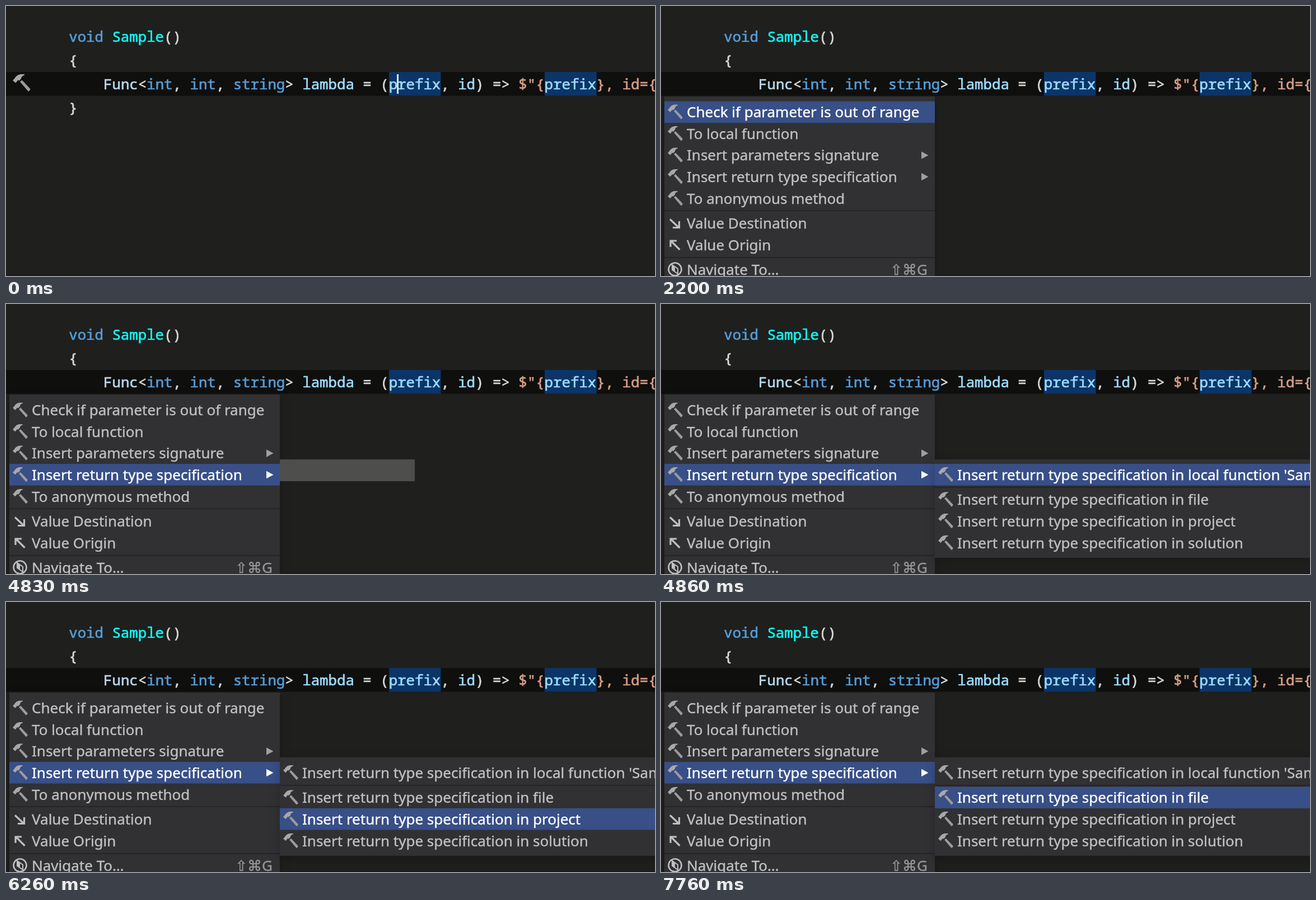
Recreate the animation shown at these times as an HTML page. Size 1159 by 483 pixels, loop 8 s.

```html
<!DOCTYPE html>
<html lang="en">
<head>
<meta charset="utf-8">
<style>
html, body { margin: 0; width: 100%; height: 100%; overflow: hidden; background: #1f1f1e; }
svg { display: block; width: 1159px; height: 483px; }
text {
  white-space: pre; font: 26px "Noto Sans", "DejaVu Sans", sans-serif;
  font-variant-ligatures: none; stroke-width: .4px;
}
.code { font: 25.74px "Noto Sans Mono", "DejaVu Sans Mono", monospace; stroke-width: .7px; }
</style>
</head>
<body>
<svg id="stage" viewBox="0 0 1159 483"></svg>
<script>
const LOOP = 8000, CHAR = 15.444, ROW = 38.6;
const PLAIN = '#d6d6d4', KEYWORD = '#569cd6', NAME = '#9cdcfe', STRING = '#d69d85';
const MENU = '#313133', SELECTED = '#384f87', LABEL = '#bfc0c2';

// [start time, selected row]
const mainSteps = [[2200, 0], [3700, 1], [4100, 2], [4400, 3]];
const subSteps = [[4860, 0], [5760, 1], [6260, 2], [6530, 3], [6960, 0], [7760, 1]];

const mainRows = [
  { y: 170.5, label: 'Check if parameter is out of range' },
  { y: 209, label: 'To local function' },
  { y: 247.5, label: 'Insert parameters signature', arrow: true },
  { y: 286, label: 'Insert return type specification', arrow: true },
  { y: 325, label: 'To anonymous method' },
  { y: 369.5, label: 'Value Destination', icon: destination },
  { y: 408, label: 'Value Origin', icon: origin },
  { y: 452.5, label: 'Navigate To…', icon: compass, keys: '⇧⌘G' },
];
const insert = 'Insert return type specification in ';
const subRows = [
  { y: 286, label: insert + "local function 'Sample'" },
  { y: 330.5, label: insert + 'file' },
  { y: 369, label: insert + 'project' },
  { y: 408, label: insert + 'solution' },
];

const rect = (x, y, w, h, fill, extra = '') =>
  `<rect x="${x}" y="${y}" width="${w}" height="${h}" fill="${fill}" ${extra}/>`;
const path = (d, fill, extra = '') => `<path d="${d}" fill="${fill}" ${extra}/>`;
const escapeText = s => s.replace(/&/g, '&amp;').replace(/</g, '&lt;').replace(/>/g, '&gt;');
const ink = color => `fill="${color}" stroke="${color}"`;
const text = (x, y, s, color, extra = '') =>
  `<text x="${x}" y="${y}" ${ink(color)} ${extra}>${escapeText(s)}</text>`;

function code(x, y, ...tokens) {
  const spans = tokens.map(([s, color]) => `<tspan ${ink(color)}>${escapeText(s)}</tspan>`);
  return `<text class="code" x="${x}" y="${y}">${spans.join('')}</text>`;
}

function hammer(x, y, scale = 0.85) {
  return `<g transform="translate(${x} ${y}) scale(${scale})">` +
    path('M13 13.5L16.5 10.5L31.5 26.5Q31 29 28 31Z', '#9c9c9c') +
    path('M0 11L3 8Q7 1 14 0H21V1.5Q15.5 3 15 8L11.5 11.5L9 10.5L8 12.5L5 15.5Z', '#a8a8a8') + '</g>';
}

const stroke = d => path(d, 'none', `stroke="${LABEL}" stroke-width="3.2"`);
function destination(x, y) { return stroke(`M${x + 4} ${y + 12}l15 14M${x + 9} ${y + 27}h11.5v-11.5`); }
function origin(x, y) { return stroke(`M${x + 21.5} ${y + 28}l-15 -15M${x + 16} ${y + 12}h-11v11`); }
function compass(x, y) {
  const cx = x + 13, cy = y + 18.5;
  return `<circle cx="${cx}" cy="${cy}" r="11.5" fill="none" stroke="${LABEL}" stroke-width="2.6"/>` +
    path(`M${cx - 5} ${cy - 8}l10 7v9l-10 -7z`, 'none', `stroke="${LABEL}" stroke-width="2"`) +
    path(`M${cx - 5} ${cy - 8}l5 4v9l-5 -4z`, LABEL);
}

function menuRow(row, x, width, selected) {
  const color = selected ? '#fff' : LABEL;
  const icon = row.icon || ((ix, iy) => hammer(ix, iy + 6));
  return (selected ? rect(x, row.y, width, ROW, SELECTED) : '') +
    icon(x + 6, row.y) +
    text(x + 40, row.y + 28.8, row.label, color) +
    (row.arrow ? path(`M465 ${row.y + 12.7}l12.5 6.8l-12.5 6.8z`, selected ? '#fff' : '#a0a0a2') : '') +
    (row.keys ? text(476, row.y + 28.8, row.keys, '#96969a', 'text-anchor="end"') : '');
}

function menu(x, y, width, height, rows, separators, selected) {
  return rect(x, y, width, height, MENU, 'filter="url(#shadow)"') +
    separators.map(sy => rect(x, sy, width, 2, '#252527')).join('') +
    rows.map((row, i) => menuRow(row, x, width, i === selected)).join('');
}

function editor() {
  return rect(0, 0, 1159, 483, '#1f1f1e') + rect(0, 118, 1159, 42.5, '#0f0f0e') +
    rect(684, 118, 92.5, 42.5, '#0b3568') + rect(962, 118, 92.7, 42.5, '#0b3568') +
    code(112.2, 64, ['void ', KEYWORD], ['Sample', '#0ff8f2'], ['()', PLAIN]) +
    code(112.2, 106, ['{', PLAIN]) +
    code(174, 149,
      ['Func', '#b8d9ea'], ['<', PLAIN], ['int', KEYWORD], [', ', PLAIN], ['int', KEYWORD],
      [', ', PLAIN], ['string', KEYWORD], ['> ', PLAIN], ['lambda', NAME], [' = (', PLAIN],
      ['prefix', NAME], [', ', PLAIN], ['id', NAME], [') => ', PLAIN], ['$"{', STRING],
      ['prefix', NAME], ['}, id={', STRING]) +
    code(112.2, 191, ['}', PLAIN]) +
    rect(0, 482, 1159, 1, '#181617');
}

const stepAt = (steps, t) => steps.filter(([start]) => t >= start).pop()?.[1] ?? -1;

function scene({ caret, opening, mainRow, subOpening, subRow }) {
  let s = '<filter id="shadow" x="-10%" y="-20%" width="120%" height="140%" color-interpolation-filters="sRGB">' +
    '<feDropShadow dx="0" dy="6" stdDeviation="9" flood-opacity=".2"/></filter>' + editor();
  if (mainRow < 0 && !opening) s += hammer(12, 122, 1);
  if (caret) s += rect(684 + CHAR - 1.4, 122, 3, 35, '#e8e8e8');
  if (opening) s += rect(6, 162, 241, 39, '#4e4e4d');
  if (mainRow >= 0) s += menu(6, 162, 483, 330, mainRows, [365, 449], mainRow);
  if (subOpening) s += rect(489, 278, 241, 39, '#4e4e4d');
  if (subRow >= 0) s += menu(489, 278, 700, 176, subRows, [327], subRow);
  return s;
}

const stage = document.getElementById('stage');
let shown = '';
function draw(now) {
  const t = now % LOOP;
  const state = {
    caret: t < 2160 && (t < 430 || Math.floor((t - 430) / 500) % 2 === 1),
    opening: t >= 2160 && t < 2200,
    mainRow: stepAt(mainSteps, t),
    subOpening: t >= 4830 && t < 4860,
    subRow: stepAt(subSteps, t),
  };
  const key = JSON.stringify(state);
  if (key !== shown) {
    stage.innerHTML = scene(state);
    shown = key;
  }
  requestAnimationFrame(draw);
}
draw(performance.now());
</script>
</body>
</html>
```
